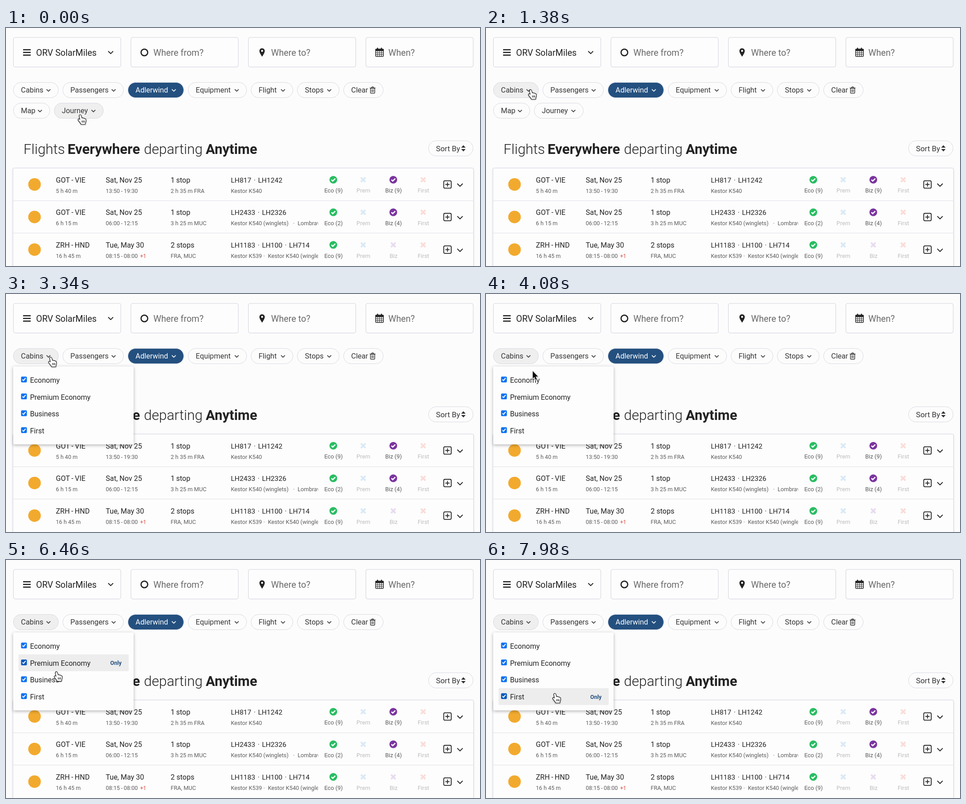
Recreate the animation shown at these times as an HTML page with a canvas. Size 1055x531 px, loop 8000 ms.

```html
<!DOCTYPE html>
<html lang="en">
<head>
<meta charset="utf-8">
<title>Flight search</title>
<style>
html, body { margin: 0; width: 100%; height: 100%; overflow: hidden; background: #fcfcfc; }
canvas { display: block; width: 1055px; height: 531px; }
</style>
</head>
<body>
<canvas id="stage"></canvas>
<script>
const W = 1055, H = 531, LOOP = 8000, OPEN_AT = 1700;
const NAVY = '#24507f', INK = '#232323', SOFT = '#5c5c5c', FAINT = '#bdbdbd', EDGE = '#d8d9e3', PAGE = '#fcfcfc';
const canvas = document.getElementById('stage');
const ctx = canvas.getContext('2d');
const dpr = window.devicePixelRatio || 1;
canvas.width = W * dpr;
canvas.height = H * dpr;

// label, left, right, top
const pills = [
  ['Cabins', 16, 117, 121], ['Passengers', 126, 262, 121], ['Adlerwind', 271, 396, 121],
  ['Equipment', 405, 536, 121], ['Flight', 545, 639, 121], ['Stops', 648, 742, 121],
  ['Clear', 751, 840, 121], ['Map', 16, 98, 167], ['Journey', 107, 217, 167]
];
const cabins = ['Economy', 'Premium Economy', 'Business', 'First'];
const flights = [
  { route: 'GOT\u2009-\u2009VIE', length: '5 h 40 m', day: 'Sat, Nov 25', hours: '13:50\u2009-\u200919:30',
    stops: '1\u2009stop', via: '2 h 35 m FRA', codes: ['LH817', 'LH1242'], plane: 'Kestor K540', eco: 9, biz: 9 },
  { route: 'GOT\u2009-\u2009VIE', length: '6 h 15 m', day: 'Sat, Nov 25', hours: '06:00\u2009-\u200912:15',
    stops: '1\u2009stop', via: '3 h 25 m MUC', codes: ['LH2433', 'LH2326'], plane: 'Kestor K540 (winglets)',
    next: 'Lombravia', nextX: 649, eco: 2, biz: 4 },
  { route: 'ZRH\u2009-\u2009HND', length: '16 h 45 m', day: 'Tue, May 30', hours: '08:15\u2009-\u200908:00', plus: true,
    stops: '2 stops', via: 'FRA, MUC', codes: ['LH1183', 'LH100', 'LH714'], plane: 'Kestor K539',
    next: 'Kestor K540 (winglets)', nextX: 583, eco: 9, biz: 0 }
];

// time, x, y of the pointer tip
const path = [
  [0, 166, 193.5], [100, 166, 193.5], [900, 100, 137.5], [3100, 100, 137.5],
  [4080, 104, 172], [5020, 109, 218], [6460, 113, 249], [7980, 154, 297.5], [8000, 154, 297.5]
];

// Monotone cubic through the path points
function along(t, axis) {
  const slope = i => (path[i + 1][axis] - path[i][axis]) / (path[i + 1][0] - path[i][0]);
  const tangent = i => {
    if (i === 0 || i === path.length - 1) return 0;
    const a = slope(i - 1), b = slope(i);
    return a * b <= 0 ? 0 : 2 * a * b / (a + b);
  };
  let i = 0;
  while (i < path.length - 2 && t >= path[i + 1][0]) i++;
  const d = path[i + 1][0] - path[i][0], u = (t - path[i][0]) / d, v = 1 - u;
  return v * v * (1 + 2 * u) * path[i][axis] + u * v * v * d * tangent(i)
    + u * u * (3 - 2 * u) * path[i + 1][axis] - u * u * v * d * tangent(i + 1);
}

function text(s, x, y, size, color, weight = 400, align = 'left') {
  ctx.font = `${weight} ${size}px Roboto, sans-serif`;
  ctx.fillStyle = color;
  ctx.textAlign = align;
  ctx.fillText(s, x, y);
}

function box(x, y, w, h, r, fill, stroke, lw = 1) {
  ctx.beginPath();
  ctx.roundRect(x, y, w, h, r);
  if (fill) { ctx.fillStyle = fill; ctx.fill(); }
  if (stroke) { ctx.strokeStyle = stroke; ctx.lineWidth = lw; ctx.stroke(); }
}

function line(color, lw, ...pts) {
  ctx.beginPath();
  for (let i = 0; i < pts.length; i += 2) ctx.lineTo(pts[i], pts[i + 1]);
  ctx.strokeStyle = color;
  ctx.lineWidth = lw;
  ctx.stroke();
}

function disc(x, y, r, fill) {
  ctx.beginPath();
  ctx.arc(x, y, r, 0, Math.PI * 2);
  ctx.fillStyle = fill;
  ctx.fill();
}

function shadow(color, blur = 0, dy = 0) {
  ctx.shadowColor = color;
  ctx.shadowBlur = blur * dpr;
  ctx.shadowOffsetY = dy * dpr;
}

function chevron(x, y, r, color, lw) {
  line(color, lw, x - r, y - r / 2, x, y + r / 2, x + r, y - r / 2);
}

function drawFields() {
  for (const x of [16.5, 278, 539.5, 801]) box(x, 21, 239, 66, 4, '#fdfdfd', '#d0d0de');
  for (const y of [48.5, 54.5, 60.5]) line(INK, 2.6, 38, y, 55, y);
  text('ORV SolarMiles', 67, 61.5, 19.6, INK);
  chevron(233, 54.5, 5.5, INK, 1.8);
  ctx.beginPath();
  ctx.arc(308, 54.5, 7.4, 0, Math.PI * 2);
  ctx.lineWidth = 2.7;
  ctx.stroke();
  text('Where from?', 328, 61.5, 19.7, '#6a6a6a');

  ctx.beginPath();
  ctx.arc(570, 51.2, 6, Math.PI * 0.88, Math.PI * 2.12);
  ctx.quadraticCurveTo(574.5, 57, 570, 64);
  ctx.quadraticCurveTo(565.5, 57, 564.3, 53.5);
  ctx.fillStyle = INK;
  ctx.fill();
  disc(570, 51, 2.2, '#fdfdfd');
  text('Where to?', 590, 61.5, 19.7, '#6a6a6a');

  box(822.7, 47, 17.2, 16.5, 1.5, null, INK, 1.5);
  ctx.fillStyle = INK;
  ctx.fillRect(822, 47, 18.6, 4.5);
  for (const x of [827, 831.3, 835.6]) line(INK, 1, x, 51, x, 63);
  for (const y of [55.3, 59.3]) line(INK, 1, 823, y, 840, y);
  for (const x of [827, 835.6]) line(INK, 2.4, x, 44, x, 49);
  text('When?', 851, 61.5, 19.7, '#6a6a6a');
}

function drawTrash(x, y) {
  box(x - 4.7, y - 4, 9.4, 11, 1.2, null, '#333', 1.4);
  line('#333', 1.4, x - 6.5, y - 4.6, x + 6.5, y - 4.6);
  line('#333', 1.3, x - 2.5, y - 5, x - 1.6, y - 7, x + 1.6, y - 7, x + 2.5, y - 5);
  for (const d of [-2, 0, 2]) line('#333', 1, x + d, y - 1.5, x + d, y + 4.5);
}

function drawPills(hover) {
  pills.forEach(([label, l, r, y], i) => {
    const on = label === 'Adlerwind', color = on ? '#fff' : '#363636';
    box(l + .5, y + .5, r - l - 1, 34, 17, on ? NAVY : i === hover ? '#efefef' : PAGE, EDGE);
    text(label, l + 17.3, y + 23, 16.3, color);
    if (label === 'Clear') drawTrash(816, 138.5);
    else chevron(r - 22.5, y + 18, 4.3, color, 1.6);
  });
}

function drawHeading() {
  text('Flights', 39, 280.5, 31.3, INK, 300);
  text('Everywhere', 137, 280.5, 31, INK, 600);
  text('departing', 307, 280.5, 31.3, INK, 300);
  text('Anytime', 444.5, 280.5, 30.8, INK, 600);
  box(940.5, 251.5, 99, 34, 17, PAGE, EDGE);
  text('Sort By', 957, 274.5, 16.8, '#363636');
  ctx.fillStyle = '#333';
  for (const s of [-1, 1]) {
    ctx.beginPath();
    ctx.moveTo(1013, 268.5 + s * 1.5);
    ctx.lineTo(1023, 268.5 + s * 1.5);
    ctx.lineTo(1018, 268.5 + s * 7);
    ctx.fill();
  }
}

function tick(x, y, color) {
  disc(x, y, 8.6, color);
  line('#fff', 2.6, x - 4.2, y + .1, x - 1.2, y + 3, x + 4.4, y - 2.6);
}

function cross(x, y, color) {
  line(color, 3.8, x - 5, y - 5, x + 5, y + 5);
  line(color, 3.8, x + 5, y - 5, x - 5, y + 5);
}

function seat(name, x, y, count, color) {
  (count ? tick : cross)(x, y, color);
  text(count ? `${name} (${count})` : name, x + .5, y + 28.7, 13, count ? SOFT : FAINT, 400, 'center');
}

function drawFlight(f, i) {
  const y = 312 + i * 72.7, top = y + 32.7, low = y + 55.5;
  if (i) line('#dfe0e8', 1, 16, Math.round(y) + .5, 1040, Math.round(y) + .5);
  disc(63.5, y + 37, 14, '#f2aa2e');
  text(f.route, 111, top, 16, INK);
  text(f.length, 111, low, 12.5, SOFT);
  text(f.day, 222, top, 16, INK);
  text(f.hours, 222, low, 12.6, SOFT);
  if (f.plus) text('+1', 298.5, low, 12, '#d9483b');
  text(f.stops, 366.5, top, 16, INK);
  text(f.via, 366.5, low, 12.7, SOFT);
  text(f.codes.join(' \u200a·\u200a '), 500.5, top, 15.5, INK);
  ctx.save();
  ctx.beginPath();
  ctx.rect(500, y + 40, 194.5, 30);
  ctx.clip();
  text(f.plane, 500.5, low, 12.7, SOFT);
  if (f.next) {
    text('·', f.nextX - 10, low, 12.7, SOFT);
    text(f.next, f.nextX, low, 12.7, SOFT);
  }
  ctx.restore();
  seat('Eco', 728.5, y + 26.5, f.eco, '#29bd62');
  seat('Prem', 795, y + 26.5, 0, '#d9e9f6');
  seat('Biz', 862, y + 26.5, f.biz, f.biz ? '#7b349f' : '#e8dcf0');
  seat('First', 928.5, y + 26.5, 0, '#fbdcd8');
  box(974.3, y + 28.8, 16.6, 16.6, 2.5, null, INK, 1.8);
  line(INK, 1.8, 977.8, y + 37.1, 987.4, y + 37.1);
  line(INK, 1.8, 982.6, y + 32.3, 982.6, y + 41.9);
  chevron(1010.5, y + 38.2, 6, INK, 2);
}

function drawResults() {
  shadow('rgba(90,95,160,.3)', 4, 1);
  box(16, 313, 1024, 240, 3, '#fdfdfd');
  shadow('transparent');
  box(15.5, 312.5, 1025, 240, 3, null, '#d6d7e4');
  flights.forEach(drawFlight);
}

function drawMenu(hover) {
  shadow('rgba(0,0,0,.3)', 7, 2);
  box(16, 161.5, 268, 174, 3, '#fdfdfd');
  shadow('transparent');
  cabins.forEach((name, i) => {
    const y = 191 + i * 37.7, on = i === hover;
    if (on) {
      box(28, y - 18.3, 245, 37.7, 2, '#ededed');
      text('Only', 232, y + 5.5, 12.5, NAVY, 700);
    }
    box(33.5, y - 6.8, 13, 13, 2.2, on ? '#0858be' : '#0d72f2');
    line('#fff', 2, 36.6, y - .3, 39, y + 2.3, 43.6, y - 3.6);
    text(name, 53.5, y + 6.8, 16, INK);
  });
}

function shape(d, fill, lw, stroke) {
  const p = new Path2D(d);
  shadow('rgba(0,0,0,.35)', 2.5, 1);
  ctx.lineWidth = lw;
  ctx.strokeStyle = stroke;
  ctx.stroke(p);
  shadow('transparent');
  ctx.fillStyle = fill;
  ctx.fill(p);
}

function drawPointer(x, y, hand) {
  ctx.save();
  ctx.translate(x, y);
  ctx.lineJoin = 'round';
  if (hand) {
    shape('M-2.6 2.6Q-2.6.6-.8.6Q.8.6 1.2 2.4L2.6 8Q4.4 6.6 5.8 8.5Q7.6 7.3 8.8 9.4Q11.3 8.8 11.6 11.6'
      + 'Q12 15 10.4 18L10.2 21H1.4Q.4 18.5-1.5 16.6Q-3.4 14.4-5 11.8Q-5.4 9.7-3.7 9.7Q-2.2 10.2-.9 12Z',
      '#fff', 2.2, '#111');
    for (const d of [3.2, 5.8, 8.3]) line('#111', 1.1, d, 13, d + .2, 17.5);
  } else {
    shape('M0 0V16.5L3.7 13.1L6.4 19.3L9.2 18.1L6.6 12.1H11.8Z', '#0b0b0b', 2, '#fff');
  }
  ctx.restore();
}

function draw(t) {
  const x = along(t, 1), y = along(t, 2), hot = y - 1.5, open = t >= OPEN_AT;
  let pill = pills.findIndex(p => x > p[1] && x < p[2] && hot > p[3] && hot < p[3] + 34);
  let row = -1;
  if (open) {
    if (hot > 161) pill = -1;
    if (x > 28 && x < 273) row = Math.floor((hot - 172.7) / 37.7);
    if (row > 3) row = -1;
  }
  ctx.setTransform(dpr, 0, 0, dpr, 0, 0);
  ctx.fillStyle = PAGE;
  ctx.fillRect(0, 0, W, H);
  drawFields();
  drawPills(open ? 0 : pill);
  drawHeading();
  drawResults();
  if (open) drawMenu(row);
  drawPointer(x, y, pill >= 0 || row >= 0);
}

const start = performance.now();
function frame() {
  draw((performance.now() - start) % LOOP);
  requestAnimationFrame(frame);
}
frame();
</script>
</body>
</html>
```
